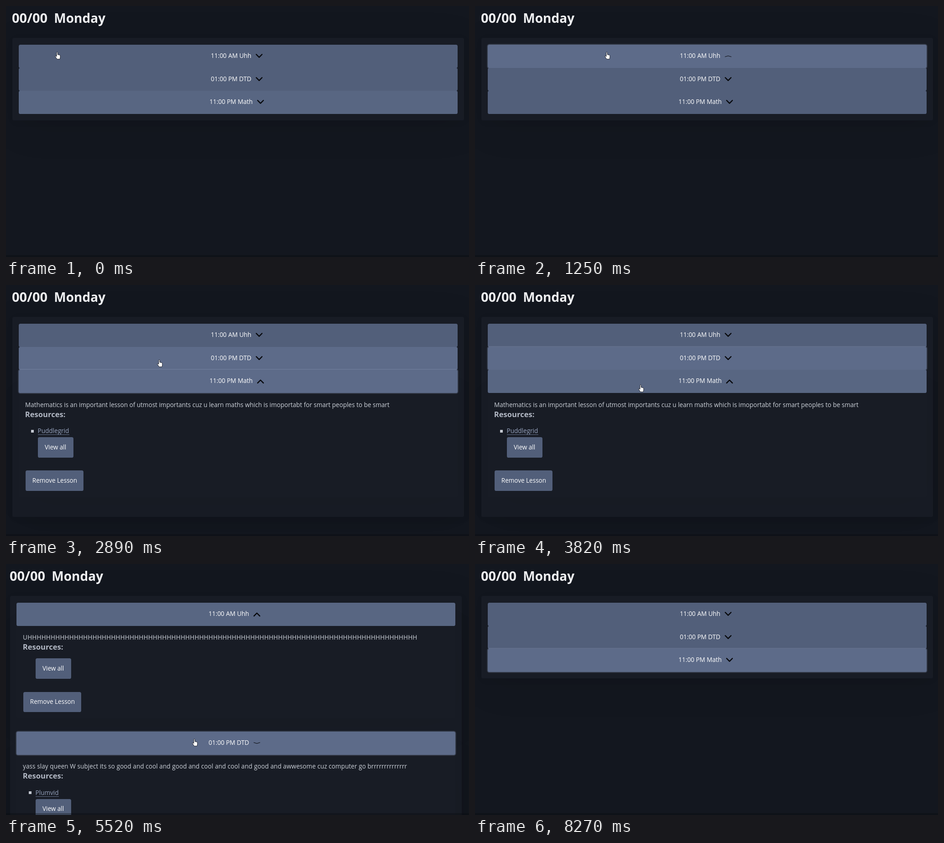
Recreate the animation shown at these times as an HTML page. Size 1016 by 551 pixels, loop 8.34 s.

```html
<!DOCTYPE html>
<html lang="en">
<head>
<meta charset="utf-8">
<title>Timetable</title>
<style>
  html, body { margin: 0; width: 100%; height: 100%; overflow: hidden; background: #13171f; }
  #stage { position: relative; width: 1016px; height: 551px; overflow: hidden; }
  #stage div, #stage span, #hand { position: absolute; }
  #page { left: 0; top: 0; }
  span {
    font-family: "Open Sans", "Noto Sans", sans-serif;
    line-height: 20px; white-space: pre; color: #cdd2da;
  }
  .card, .panel { background: #181c25; border-radius: 3.6px; }
  .card {
    left: 13.8px; top: 70.4px; width: 991.4px;
    box-shadow: 1.6px 3.2px 19px rgba(7,9,12,.04), 7.2px 14.4px 86px rgba(7,9,12,.09);
  }
  .panel { box-shadow: 7.2px 14.4px 86px rgba(7,9,12,.06); }
  .row, .panel { left: 28.2px; width: 962.6px; }
  #stage .row {
    display: flex; justify-content: center; align-items: flex-start;
    box-sizing: border-box; padding-right: 6px; height: 50.75px; border-radius: 3.6px; z-index: 1;
  }
  #stage .row span { position: relative; top: 14px; }
  .row svg { margin-left: 10px; overflow: visible; }
  .row span, .button span { color: #fff; }
  .button { height: 44.4px; border-radius: 3.6px; background: #525f7a; }
  .bullet { left: 26.6px; width: 5.8px; height: 5.8px; background: #c2c7d0; }
  .line { left: 41.8px; height: 1px; background: #646f88; }
  #edge { left: 0; top: 547px; width: 1016px; height: 4px; background: rgba(7,9,12,.35); }
  #hand { z-index: 2; }
</style>
</head>
<body>
<div id="stage">
  <div id="page"></div>
  <div id="edge"></div>
  <svg id="hand" width="13" height="18" viewBox="-.5 -.5 13 18">
    <path d="M3.6 9.2V1.9a1.2 1.2 0 0 1 2.4 0V6.2l4 .8q1.6.4 1.5 2v3q0 1.6-1 4.2H4.6L.8 10.6Q.2 9.2 1.4 8.9q.9-.2 2.2 1.6z"
      fill="#fff" stroke="#11141b" stroke-width=".9" stroke-linejoin="round"/>
  </svg>
</div>
<script>
const LOOP = 8340, HIDE = 8070, BLUR = 8272;
const TOP = 84.8, ROW = 50.75, PAD = 14.4, SIZE = 13.54;

const lessons = [
  { title: "11:00 AM Uhh", clicks: [500, 1185, 1650, 1980, 4900, 6750],
    about: "U" + "H".repeat(84), spacing: .2 },
  { title: "01:00 PM DTD", clicks: [2980, 3400, 5450, 6300], link: "Plumvid", spacing: .07,
    about: "yass slay queen W subject its so good and cool and good and cool and cool and good and awwesome cuz computer go brrrrrrrrrrrrrr" },
  { title: "11:00 PM Math", clicks: [2350, 4080, 4300, 7550], link: "Puddlegrid", spacing: 0,
    about: "Mathematics is an important lesson of utmost importants cuz u learn maths which is imoportabt for smart peoples to be smart" }
];

const clicks = lessons
  .flatMap((l, row) => l.clicks.map(time => ({ time, row })))
  .sort((a, b) => a.time - b.time);

const page = document.getElementById("page");
const hand = document.getElementById("hand");

function box(parent, cls, style = {}) {
  const el = document.createElement("div");
  el.className = cls;
  for (const k in style) el.style[k] = style[k] + "px";
  parent.append(el);
  return el;
}

// y is the baseline
function text(parent, str, x, y, size = SIZE, css = "") {
  const el = document.createElement("span");
  el.textContent = str;
  el.style.cssText = `left:${x}px;top:${y - .388 * size - 10}px;font-size:${size}px;${css}`;
  parent.append(el);
  return el;
}

function button(parent, label, left, top, width) {
  text(box(parent, "button", { left, top, width }), label, PAD + .8, 27);
}

function buildRow(title) {
  const row = box(page, "row");
  row.innerHTML = `<span style="font-size:${SIZE}px">${title}</span>
    <svg width="15" height="1"><path d="M-6.3-3.9L0 2.4 6.3-3.9" fill="none" stroke="#06070a"
      stroke-width="2.4" stroke-linecap="round" stroke-linejoin="round"/></svg>`;
  return row;
}

function buildPanel(l) {
  const extra = l.link ? 25.3 : 0;
  l.size = 232.2 + extra;
  const p = box(page, "panel", { height: l.size - 2 * PAD });
  text(p, l.about, PAD - .5, 30.9, SIZE, `letter-spacing:${l.spacing}px`);
  text(p, "Resources:", PAD - .8, 53.3, 16.6, "font-weight:700;color:#b3b9c5");
  if (l.link) {
    box(p, "bullet", { top: 80.9 });
    const a = text(p, l.link, 41.4, 88.3, SIZE, "color:#98a4bf");
    box(p, "line", { top: 91, width: a.offsetWidth });
  }
  button(p, "View all", 41.6, 71.8 + extra, 78.3);
  button(p, "Remove Lesson", PAD, 145 + extra, 127.6);
  return p;
}

text(page, "00/00", 13, 37, 28.9, "font-weight:700;color:#f0f1f3");
text(page, "Monday", 105.2, 37, 28.1, "font-weight:700;color:#f0f1f3");
const card = box(page, "card");
for (const l of lessons) {
  l.row = buildRow(l.title);
  l.mark = l.row.querySelector("path");
  l.panel = buildPanel(l);
}

const wrap = t => (t % LOOP + LOOP) % LOOP;
const mix = (a, b, k) => a + (b - a) * k;
const smooth = k => {
  k = Math.min(1, Math.max(0, k));
  return k * k * (3 - 2 * k);
};

const isOpen = (i, t) => lessons[i].clicks.filter(c => c <= t).length % 2;
const lastClick = t => clicks.filter(c => c.time <= t).pop();
const focused = t => t < BLUR ? lastClick(t)?.row : -1;

function tops(t) {
  const ys = [TOP];
  lessons.forEach((l, i) => ys.push(ys[i] + ROW + isOpen(i, t) * l.size));
  return ys;
}

// Drifts right all the time and hops to the next row shortly before its click
function pointer(t) {
  const from = lastClick(t) || clicks[0];
  const to = clicks.find(c => c.time > t) || from;
  const middle = c => tops(c.time)[c.row] + ROW / 2;
  const hop = smooth((t - to.time + 400) / 160);
  const sag = 20 * Math.exp(-(((t - 3600) / 1000) ** 2)) - 2;
  return {
    x: 113 + 141 * smooth(t / 1000) + .029 * t,
    y: mix(middle(from), middle(to), hop) + sag
  };
}

function isLit(i, t) {
  if (focused(t) === i) return 1;
  const depth = pointer(t).y - 7 - tops(t)[i];
  return t < HIDE && depth >= 0 && depth < ROW ? 1 : 0;
}

// Linear transition: share of the last `span` ms in which the state held
function eased(state, i, t, span, steps = 20) {
  let sum = 0;
  for (let k = 0; k < steps; k++) sum += state(i, wrap(t - (k + .5) * span / steps));
  return sum / steps;
}

function draw(t) {
  const ys = tops(t), end = ys[lessons.length] + PAD, focus = focused(t);
  page.style.left = (end > 551 ? -5 : 0) + "px";
  card.style.height = end - 70.4 + "px";
  lessons.forEach((l, i) => {
    const lit = eased(isLit, i, t, 150), flip = 1 - 2 * eased(isOpen, i, t, 200);
    l.row.style.top = ys[i] + "px";
    l.row.style.background = `rgb(${mix(82, 93, lit)},${mix(95, 107, lit)},${mix(122, 137, lit)})`;
    l.row.style.boxShadow = focus === i ? "0 0 0 1.8px rgba(144,158,190,.25)" : "none";
    l.mark.setAttribute("transform", `translate(7.5 ${ROW / 2 - .2}) scale(1 ${flip})`);
    l.panel.style.display = isOpen(i, t) ? "block" : "none";
    l.panel.style.top = ys[i] + ROW + "px";
  });
  const { x, y } = pointer(t);
  hand.style.display = t < HIDE ? "block" : "none";
  hand.style.left = x - 6.5 + "px";
  hand.style.top = y - 8.5 + "px";
}

const start = performance.now();
function tick() {
  draw(wrap(performance.now() - start));
  requestAnimationFrame(tick);
}
tick();
</script>
</body>
</html>
```
